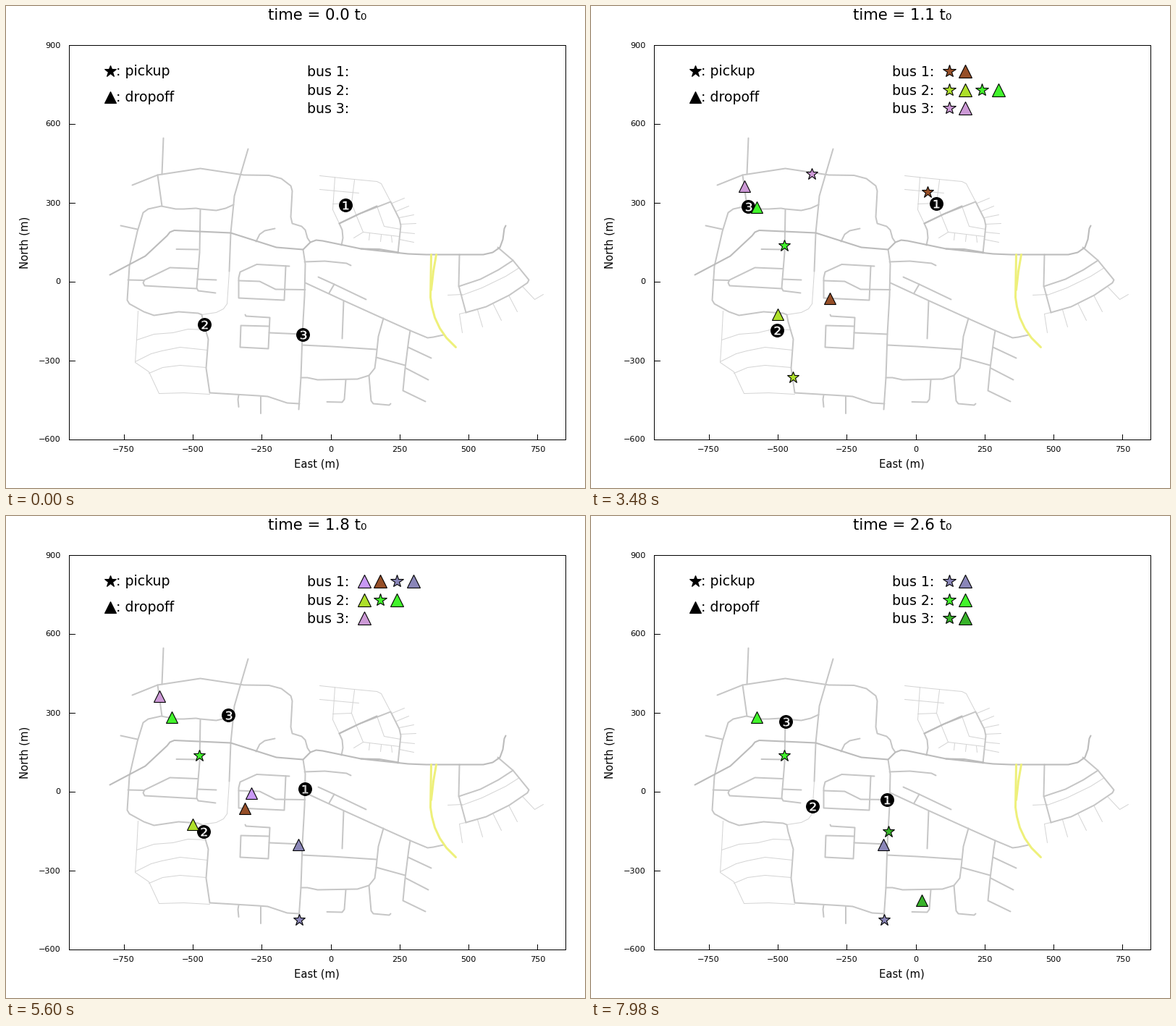
A matplotlib script for the animation above (8000 ms loop, 800 by 666 pixels).

```python
import numpy as np
import matplotlib.pyplot as plt
from matplotlib.animation import FuncAnimation
from matplotlib.collections import LineCollection
from matplotlib.path import Path
from matplotlib.textpath import TextPath

W, H, DPI = 800, 666, 100
STEP, FRAMES = 25, 320
PT = 72 / DPI

plt.rcParams["font.family"] = "DejaVu Sans"
fig = plt.figure(figsize=(W / DPI, H / DPI), dpi=DPI, facecolor="white")
ax = fig.add_axes([0, 0, 1, 1])
ax.set(xlim=(-0.5, W - 0.5), ylim=(H - 0.5, -0.5))
ax.axis("off")


def label(x, y, text, px, ha="left", **kw):
    kw.setdefault("va", "baseline")
    return ax.text(x, y, text, fontsize=px * PT, ha=ha, **kw)


def mark(x, y, shape, px, color, z):
    return ax.plot([x], [y], marker=shape, ms=px * PT, mfc=color, mec="black",
                   mew=1.1 * PT, ls="", zorder=z)[0]


# ---------- street map ----------
thin, street, main, tram = [], [], [], []


def road(kind, *xy):
    kind.append(np.reshape(xy, (-1, 2)))


# through road
road(main, 143, 371, 192, 345, 222, 317, 226, 312, 232, 309.5, 310, 313, 373, 333,
     410, 336, 420, 326, 428, 323, 437, 324, 490, 335, 555, 342, 580, 343, 659, 343,
     672, 340, 682, 333, 686, 322, 688, 307, 690, 303)
road(main, 490, 335, 515, 335.5, 542, 340)

# north-west
road(street, 217, 182, 215, 232)
road(street, 174, 247, 209, 233, 268, 224, 328, 233, 363, 233.5, 380, 238, 393, 248,
     395, 255, 393, 291, 395, 300, 408, 304, 413, 309, 416, 320, 420, 326)
road(street, 334, 197, 324, 231, 315, 262, 314, 273, 310, 313, 308, 366)
road(street, 209, 233, 215, 276)
road(street, 314, 274, 303, 279, 290, 282, 268, 280, 262, 279, 245, 280, 234, 280,
     214, 276, 196, 280, 189, 285, 181, 311, 170, 359, 167, 406, 170, 411, 190, 422,
     204, 427, 238, 422, 265, 424, 270, 426, 272, 436, 279, 460, 276, 500, 281, 534,
     348, 538, 361, 539, 388, 548, 405, 549)
road(street, 158, 303, 181, 308)

# west
road(street, 268, 281, 267, 340, 263, 389, 265, 393, 289, 396)
road(street, 235, 335.5, 265, 336)
road(street, 264, 362.5, 226, 361, 191, 378, 189, 382, 191, 386, 263, 390)
road(street, 168, 378, 190, 378.5)
road(street, 264, 377, 290, 378)
road(street, 345, 325, 350, 315, 357, 310, 371, 307)

# centre
road(street, 391, 359, 346, 356.5, 323, 367, 321, 375, 321, 403, 384, 406, 386, 359)
road(street, 321, 379, 350, 380, 372, 391, 413, 391.5)
road(street, 410, 336, 413, 356, 412, 400, 409, 453, 407, 513, 404, 557)
road(street, 330, 426, 331, 428, 364, 430, 362, 473, 323, 471, 324, 441, 363, 442)
road(street, 363, 451, 409, 453)
road(street, 412, 353, 440, 352, 470, 355, 476, 358)
road(street, 413, 382, 467, 407, 520, 431, 558, 448, 582, 458, 590, 457, 604, 454)
road(street, 431, 374, 453, 384, 497, 405)
road(street, 453, 384, 446, 396)
road(street, 466, 407, 464, 459)

# south
road(street, 409, 468, 450, 470, 511, 474)
road(street, 521, 431, 514, 456, 511, 485, 509, 500, 501, 510, 485, 515, 430, 516,
     416, 513, 407, 513)
road(street, 511, 485, 551, 496)
road(street, 558, 448, 556, 460, 551, 500, 548, 531, 579, 546)
road(street, 555, 471, 587, 486)
road(street, 552, 500, 583, 516)
road(street, 469, 516, 467, 543, 464, 547, 443, 546.5)
road(street, 501, 510, 504, 545, 507, 549, 529, 551, 531, 549)
road(street, 321, 537, 320, 543, 321, 553.5)
road(street, 351, 539, 351, 562)

# east
road(street, 626, 343, 625, 386, 635, 423)
road(street, 625, 387, 655, 377, 680, 364, 700, 351)
road(street, 679, 333, 700, 351, 722, 378, 720, 382, 695, 399, 663, 415, 635, 423)
road(thin, 630, 399, 657, 389, 690, 373, 709, 361)
road(thin, 610, 399, 630, 398)
road(thin, 635, 423, 626, 425, 630, 451)
road(thin, 651, 419, 658, 443)
road(thin, 672, 410, 684, 434)
road(thin, 694, 399, 706, 422)
road(thin, 714, 388, 730, 405, 742, 398)

# north-east estate
road(street, 463, 330, 465, 320, 464, 309, 460, 300, 487, 287, 531, 270, 543, 294,
     545, 303, 541, 341)
road(main, 460, 300, 487, 287, 512, 276)
road(thin, 433, 234, 470, 238, 512, 242, 518, 245, 531, 270)
road(thin, 433, 253, 487, 258)
road(thin, 454, 236, 451, 281, 460, 300)
road(thin, 481, 240, 477, 272, 484, 290, 493, 312, 543, 318)
road(thin, 451, 273, 477, 272)
road(thin, 512, 276, 522, 304, 545, 308)
road(thin, 493, 312, 480, 320)
for x0, y0, x1, y1 in [(533, 272, 550, 265), (539, 283, 556, 276), (543, 292, 563, 288),
                       (545, 301, 566, 300), (544, 312, 564, 314), (543, 322, 563, 326),
                       (502, 314, 501, 323), (518, 316, 517, 325), (532, 317, 533, 326)]:
    road(thin, x0, y0, x1, y1)

# south-west estate
road(thin, 182, 421, 180, 461, 178, 492, 197, 505, 211, 535, 245, 534, 281, 536)
road(thin, 180, 461, 204, 453, 230, 451, 251, 446, 276, 447)
road(thin, 178, 491, 200, 480, 215, 476, 240, 471, 278, 475)
road(thin, 197, 507, 216, 499, 240, 496, 276, 499)
road(thin, 270, 426, 290, 423, 300, 418, 305, 411, 308, 366)

# highlighted line
road(tram, 587, 343, 586, 402, 588, 415, 592, 430, 599, 445, 608, 458, 621, 471)
road(tram, 594, 343, 590, 366, 587, 392)

for lines, color, width in [(thin, "#d4d4d4", 1.0), (street, "#c6c6c6", 2.0),
                            (main, "#bcbcbc", 2.1), (tram, "#eef07a", 3.0)]:
    ax.add_collection(LineCollection(lines, colors=color, linewidths=width * PT,
                                     capstyle="round", joinstyle="round", zorder=1))

# ---------- frame, ticks, legend ----------
ink = dict(color="black", lw=1.0 * PT, zorder=2)
ax.plot([86, 772, 772, 86, 86], [53, 53, 598, 598, 53], **ink)
for v in range(-750, 751, 250):
    x = 448 + v * 95.33 / 250
    ax.plot([x, x], [598, 591], **ink)
    label(x, 615, str(v).replace("-", "\u2212"), 11.2, "center")
for v in range(-600, 901, 300):
    y = 380 - v * 109 / 300
    ax.plot([86, 94], [y, y], **ink)
    label(75, y + 4, str(v).replace("-", "\u2212"), 11.2, "right")
label(429, 637, "East (m)", 14.7, "center")
label(25.5, 326, "North (m)", 14.7, "center", va="center", rotation=90)
label(152, 95, ": pickup", 18.9)
label(152, 132, ": dropoff", 18.9)
mark(143, 89, "*", 17, "black", 4)
mark(143, 125, "^", 16, "black", 4)

ROWS = [89.5, 115, 140.5]
for n, y in enumerate(ROWS, 1):
    label(416, y + 7.3, f"bus {n}:", 18.9)
title = label(429.5, 18.3, "", 21.3, "center")


# ---------- buses ----------
def route(*stops):
    """Waypoints (x, y[, ms]); times between timed ones follow the distance."""
    xy = np.array([s[:2] for s in stops], float)
    dist = np.r_[0, np.cumsum(np.hypot(*np.diff(xy, axis=0).T))]
    timed = [i for i, s in enumerate(stops) if len(s) == 3]
    ms = np.interp(dist, dist[timed], [stops[i][2] for i in timed])
    return lambda t: (np.interp(t, ms, xy[:, 0]), np.interp(t, ms, xy[:, 1]))


def disc(char):
    """Negative circled digit as a centred marker path."""
    glyph = TextPath((0, 0), char, size=100)
    box = glyph.get_extents()
    verts = glyph.vertices - [(box.x0 + box.x1) / 2, (box.y0 + box.y1) / 2]
    verts[glyph.codes == Path.CLOSEPOLY] = 0
    return Path(verts, glyph.codes)


ROUTES = [
    route((468, 274, 3390), (477, 272, 3480), (479, 257), (453, 254), (452, 281),
          (464, 300), (463, 329.5), (430, 325, 4880), (423, 324.5), (410, 336),
          (413, 391), (372, 391), (362, 387, 6330), (350, 380), (321, 379),
          (321, 403), (384, 406), (386, 391), (409, 392, 7980)),
    route((273, 439, 500), (270, 426), (275, 446), (230, 451), (221, 453, 1400),
          (204, 454), (180, 460), (182, 421, 2220), (180, 460), (204, 454), (230, 451),
          (257, 447, 3480), (276, 446), (279, 460), (276, 500), (281, 532),
          (277, 506, 4880), (276, 500), (279, 460), (270, 426), (208, 420, 6330),
          (183.5, 421), (270, 426), (290, 423), (304, 411), (306, 400, 7980)),
    route((409, 453, 620), (413, 375, 1400), (410, 336, 1760), (373, 333),
          (339, 322, 2230), (312, 313, 2390), (314, 274, 2560), (268, 280),
          (216, 276, 3480), (210, 233), (268, 224), (304, 231, 4880), (325, 232),
          (314, 274), (268, 280), (234, 278, 6330), (215, 276), (210, 233),
          (215, 276), (268, 280), (268, 284, 7980)),
]
buses = [ax.plot([], [], marker=disc(c), ms=19 * PT, mfc="black", mec="none",
                 ls="", zorder=6)[0] for c in "\u2776\u2777\u2778"]

# ---------- riders: colour, bus, pickup, dropoff, request / pickup / dropoff ms ----------
RIDERS = [
    ("#ffa0ae", 1, (180, 446), (232.5, 452), 525, 2040, 3240),
    ("#cc99d6", 2, (304.5, 231.5), (211, 248.5), 620, 4900, 7130),
    ("#aee02a", 1, (278, 512), (257, 425), 1700, 4320, 7330),
    ("#42f42c", 1, (266.5, 330), (228, 277), 3100, 9000, 9000),
    ("#c898f5", 0, (423, 326), (338.5, 382.5), 4100, 4950, 6590),
    ("#964f28", 0, (464, 256), (329.5, 403.5), 3390, 3780, 7080),
    ("#8a86b8", 0, (404, 557.5), (403.5, 453.5), 4400, 9000, 9000),
    ("#38b32a", 2, (410, 435), (456.5, 530.5), 5800, 9000, 9000),
]
tasks = []
for color, bus, up, down, asked, picked, dropped in RIDERS:
    tasks.append((bus, asked, picked, mark(*up, "*", 17, color, 5),
                  mark(0, 0, "*", 18.5, color, 5)))
    tasks.append((bus, asked, dropped, mark(*down, "^", 16, color, 7),
                  mark(0, 0, "^", 18, color, 7)))


def draw(i):
    t = i * STEP
    title.set_text(f"time = {0.004 + 0.000326 * t:.1f} t\u2080")
    for bus, where in zip(buses, ROUTES):
        x, y = where(t)
        bus.set_data([x], [y])
    queued = [0, 0, 0]
    for bus, start, end, spot, entry in tasks:
        active = start <= t < end
        spot.set_visible(active)
        entry.set_visible(active)
        if active:
            entry.set_data([494 + 22.9 * queued[bus]], [ROWS[bus]])
            queued[bus] += 1
    return [title, *buses]


anim = FuncAnimation(fig, draw, frames=FRAMES, interval=STEP, repeat=True,
                     repeat_delay=0, blit=False)
plt.show()
```
